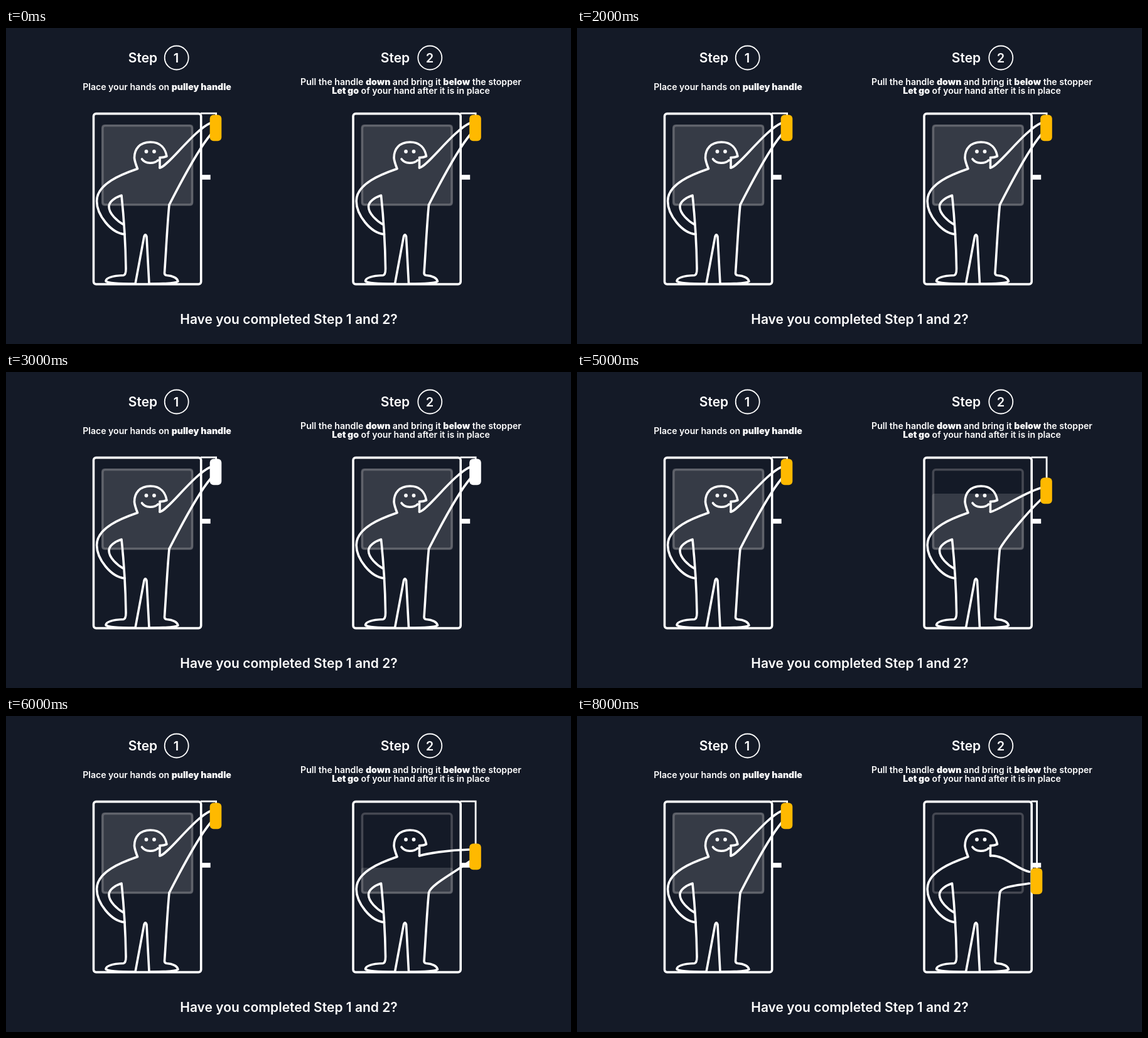
An HTML page that plays this animation: 900x504 px, repeating every 9 s.

```html
<!DOCTYPE html>
<html lang="en">
<head>
<meta charset="utf-8">
<title>Pulley handle steps</title>
<style>
  html, body { margin: 0; width: 100%; height: 100%; overflow: hidden; background: #141a27; }
  svg { display: block; width: 900px; height: 504px; }
  text { font: 600 14.1px Inter, "Open Sans", sans-serif; fill: #fff; text-anchor: middle; }
  .big { font-size: 21px; }
  .num { font-size: 20px; }
  tspan { font-weight: 900; }
  .line { fill: none; stroke: #fff; stroke-width: 3.6; stroke-linecap: round; stroke-linejoin: round; }
  .ring { fill: none; stroke: #fff; stroke-width: 1.8; }
  .rope { fill: none; stroke: #fff; stroke-width: 2.8; }
  .pane { fill: none; stroke: #454852; stroke-width: 3.6; }
  .glass { fill: #fff; fill-opacity: .145; }
  .white { fill: #fff; }
</style>
</head>
<body>
<svg viewBox="0 0 900 504">
  <defs>
    <g id="door">
      <rect class="line" x="139.5" y="136.6" width="171.2" height="272" rx="4"/>
      <rect class="white" x="311" y="234.2" width="14.7" height="7.6"/>
    </g>
    <g id="body">
      <path class="line" d="M245 223 L245 206.5 Q250 207 256 204.5 C254 193 247 182 230 182 C213 182 204.5 193 204.5 207 Q205 213 209.5 224.5 C185 233 144.6 248 144.6 276 C144.6 298 167 327 189 329"/>
      <path class="line" d="M188 314 C177 308 164 296 164 285 C164 277 174 270 184 267 C187.5 300 190.5 350 191 384 Q191 394 187 394.5 C175 395 160 397 159 403.5 C162 408 190 408 206 408"/>
      <path class="line" d="M206 408 L220 332.5 Q222 327 224 332.5 L228 408"/>
      <path class="line" d="M260 282 C257 312 255 355 252.5 391 Q252.5 394 256 394.5 C266 395 273 399 274 404 C270 408 245 408 228 408"/>
      <path class="line" d="M216.5 209 C222 217 236 217 242 211"/>
      <circle class="white" cx="223.5" cy="197" r="2.9"/>
      <circle class="white" cx="236" cy="197" r="2.9"/>
    </g>
  </defs>

  <text class="big" x="218" y="54.5">Step</text>
  <circle class="ring" cx="271.7" cy="47.5" r="19"/>
  <text class="num" x="271" y="54.5">1</text>
  <text class="big" x="620" y="54.5">Step</text>
  <circle class="ring" cx="675.3" cy="47.5" r="19"/>
  <text class="num" x="675" y="54.5">2</text>

  <text x="240.5" y="98.5">Place your hands on <tspan>pulley handle</tspan></text>
  <text x="645" y="91.3">Pull the handle <tspan>down</tspan> and bring it <tspan>below</tspan> the stopper</text>
  <text x="645" y="105.3"><tspan>Let go</tspan> of your hand after it is in place</text>
  <text class="big" x="450.5" y="472">Have you completed Step 1 and 2?</text>

  <g id="left"></g>
  <g id="right" transform="translate(413.5 0)"></g>
</svg>
<script>
  const YELLOW = "#ffb900", WHITE = "#fff";

  // drop and shift of the handle, top of the glass, upper and lower arm line
  const poses = {
    up:    { drop: 0, shift: 0, glass: 154,
             arm: "M245 223 C257 222 300 162 326 151.5 M260 282 C282 239 309 190 326 170" },
    mid:   { drop: 30, shift: 0, glass: 194,
             arm: "M245 223 C256 222 295 194 325 185 M260 282 C270 264 306 222 325 204" },
    level: { drop: 65, shift: 0, glass: 242,
             arm: "M245 223 C258 219 290 214 325 213 M260 282 C262 270 300 250 325 232" },
    low:   { drop: 105.5, shift: 0, glass: 284,
             arm: "M245 223 C268 222 294 248 325 253 M260 282 C263 272 298 274 325 270" },
    hook:  { drop: 104, shift: -15.5, glass: 284,
             arm: "M245 223 C267 221 286 244 307 248.5 M260 282 C262 271 290 270 307 267" }
  };

  // one entry per second: pose of the second figure, handle colour
  const steps = [
    ["up", YELLOW], ["up", WHITE], ["up", YELLOW], ["up", WHITE], ["up", YELLOW],
    ["mid", YELLOW], ["level", YELLOW], ["low", YELLOW], ["hook", YELLOW]
  ];

  function makePanel(id) {
    const root = document.getElementById(id);
    root.innerHTML = `
      <rect class="pane" x="153.9" y="155.8" width="142.6" height="126" rx="4"/>
      <rect class="glass" x="152.1" width="146.2" rx="4"/>
      <use href="#door"/>
      <path class="rope"/>
      <use href="#body"/>
      <path class="line arm"/>
      <rect class="handle" width="18.6" height="41.8" rx="6"/>`;
    const find = name => root.querySelector("." + name);
    const glass = find("glass"), rope = find("rope"), arm = find("arm"), handle = find("handle");
    return (pose, color) => {
      const { drop, shift, glass: top, arm: armPath } = poses[pose];
      glass.setAttribute("y", top);
      glass.setAttribute("height", Math.max(0, 283.6 - top));
      rope.setAttribute("d", `M310 136.2 H${334.6 + shift} V${142 + drop}`);
      arm.setAttribute("d", armPath);
      handle.setAttribute("x", 324.7 + shift);
      handle.setAttribute("y", 138.4 + drop);
      handle.setAttribute("fill", color);
    };
  }

  const drawLeft = makePanel("left"), drawRight = makePanel("right");
  const start = performance.now();

  function draw() {
    const now = Math.max(0, performance.now() - start);
    const [pose, color] = steps[Math.floor(now / 1000) % steps.length];
    drawLeft("up", color);
    drawRight(pose, color);
    requestAnimationFrame(draw);
  }
  draw();
</script>
</body>
</html>
```
